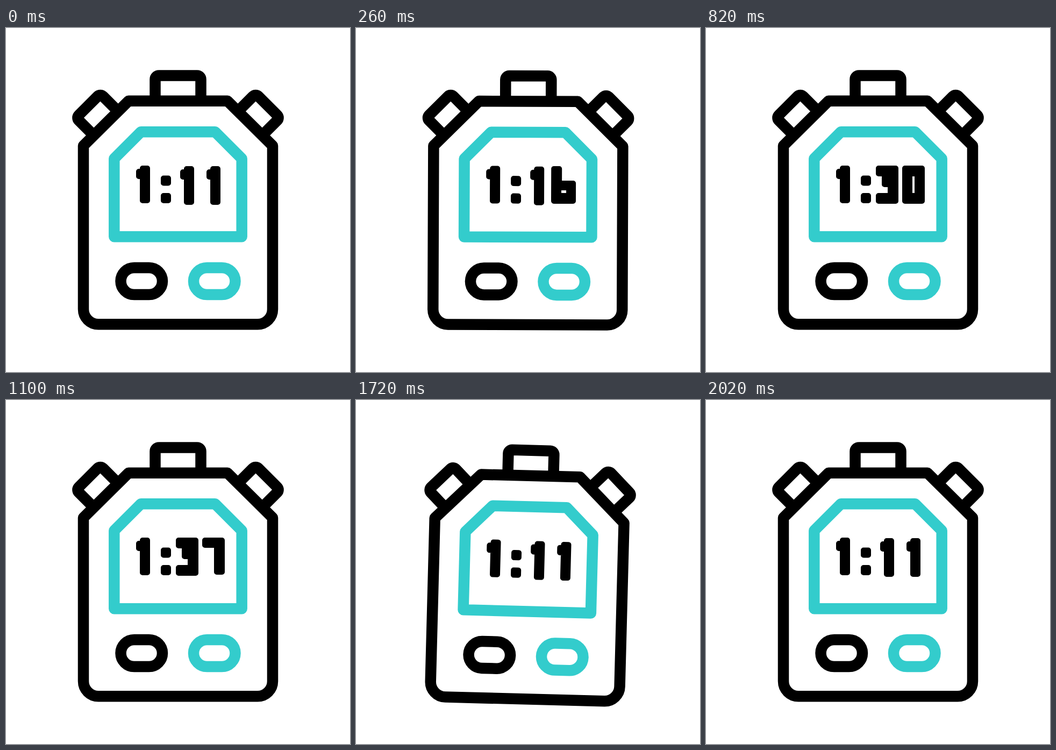
Animation, 640 px wide and 640 px high, one loop 2400 ms. Source, as an HTML page:

```html
<!DOCTYPE html>
<html lang="en">
<head>
<meta charset="utf-8">
<title>Stopwatch</title>
<style>
  html, body { margin: 0; width: 100%; height: 100%; overflow: hidden; background: #fff; }
  svg { display: block; width: 100vw; height: 100vh; }
  .line { fill: none; stroke: #000; stroke-width: 20.5; stroke-linejoin: round; }
  .teal { stroke: #33cccc; }
  .digit { fill: #000; fill-rule: evenodd; stroke: #000; stroke-width: 10; stroke-linejoin: round; }
</style>
</head>
<body>
<svg viewBox="0 0 640 640">
  <defs>
    <path id="side" d="M163.5 200L135.5 172a7 7 0 0 1 0-10L170.5 127a7 7 0 0 1 10 0L208.5 155"/>
  </defs>
  <g id="watch">
    <g class="line">
      <path d="M277.5 136V95.5a7 7 0 0 1 7-7h71a7 7 0 0 1 7 7V136"/>
      <use href="#side"/>
      <use href="#side" transform="matrix(-1 0 0 1 640 0)"/>
      <path d="M144 219L228 135.7H412L496 219V523a28 28 0 0 1-28 28.3H172a28 28 0 0 1-28-28.3Z"/>
      <rect x="213.5" y="446" width="77.5" height="50" rx="25"/>
      <rect class="teal" x="349" y="446" width="77.5" height="50" rx="25"/>
      <path class="teal" d="M201.3 243L251 193.3H389L438.7 243V388.2H201.3Z"/>
    </g>
    <g class="digit">
      <path d="M254 261H263V321H254V276H247V267H254Z"/>
      <path d="M293 279.5h9v9h-9ZM293 312h9v9h-9Z"/>
      <path id="tens" transform="translate(-49 0)"/>
      <path id="ones"/>
    </g>
  </g>
</svg>
<script>
const LOOP = 2400, TICK = 20;
const RESET = 1660;
const PRESSES = [{ start: 0, length: 420 }, { start: 1540, length: 480 }];

// Outlines are inset by half the digit stroke, which rounds their corners.
const GLYPHS = [
  "M370 261H402V322H370ZM379 271V312H393V271Z",
  "M385 262H394V324H385V277H378V268H385Z",
  "M370 261H402V287L379 312H402V322H370V308L392 281V270H380V279H370Z",
  "M370 261H402V322H370V312H392V291H381V271H370Z",
  "M391 263H400V299H406V308H400V324H391V308H366V303Z",
  "M370 261H402V271H380V283H402V322H370V312H392V293H370Z",
  "M368 261H378V288H404V321H368ZM377 296V311H396V296Z",
  "M370 261H402V320H392V270H370Z",
  "M370 261H402V322H370ZM377 268V283H395V268ZM377 297V312H395V297Z",
  "M404 322H394V295H368V262H404ZM395 287V272H376V287Z"
];

const [watch, tens, ones] = ["watch", "tens", "ones"].map(id => document.getElementById(id));
const mix = (a, b, p) => a + (b - a) * p;

// Push straight down, tip to the right, then settle back.
function pose(u) {
  const PUSHED = 0.25, TIPPED = 1 / 3;
  const depth = 12, tipDrop = 6.7, tipAngle = 1.95;
  if (u <= 0 || u >= 1) return { drop: 0, angle: 0 };
  if (u < PUSHED) return { drop: depth * Math.sin(u / PUSHED * Math.PI / 2), angle: 0 };
  if (u < TIPPED) {
    const p = (u - PUSHED) / (TIPPED - PUSHED);
    return { drop: mix(depth, tipDrop, p), angle: tipAngle * p };
  }
  const rest = Math.pow((1 - u) / (1 - TIPPED), 4);
  return { drop: tipDrop * rest, angle: tipAngle * rest };
}

function draw(time) {
  const t = Math.floor(time % LOOP / TICK) * TICK;
  const press = t < PRESSES[1].start ? PRESSES[0] : PRESSES[1];
  const { drop, angle } = pose((t - press.start) / press.length);
  watch.setAttribute("transform",
    `translate(0 ${drop.toFixed(3)}) rotate(${angle.toFixed(3)} 320 320)`);

  const count = t < RESET ? 11 + Math.max(0, Math.floor((t - 60) / 40)) : 11;
  tens.setAttribute("d", GLYPHS[Math.floor(count / 10)]);
  ones.setAttribute("d", GLYPHS[count % 10]);
}

const began = performance.now();
function frame() {
  draw(performance.now() - began);
  requestAnimationFrame(frame);
}
frame();
</script>
</body>
</html>
```
